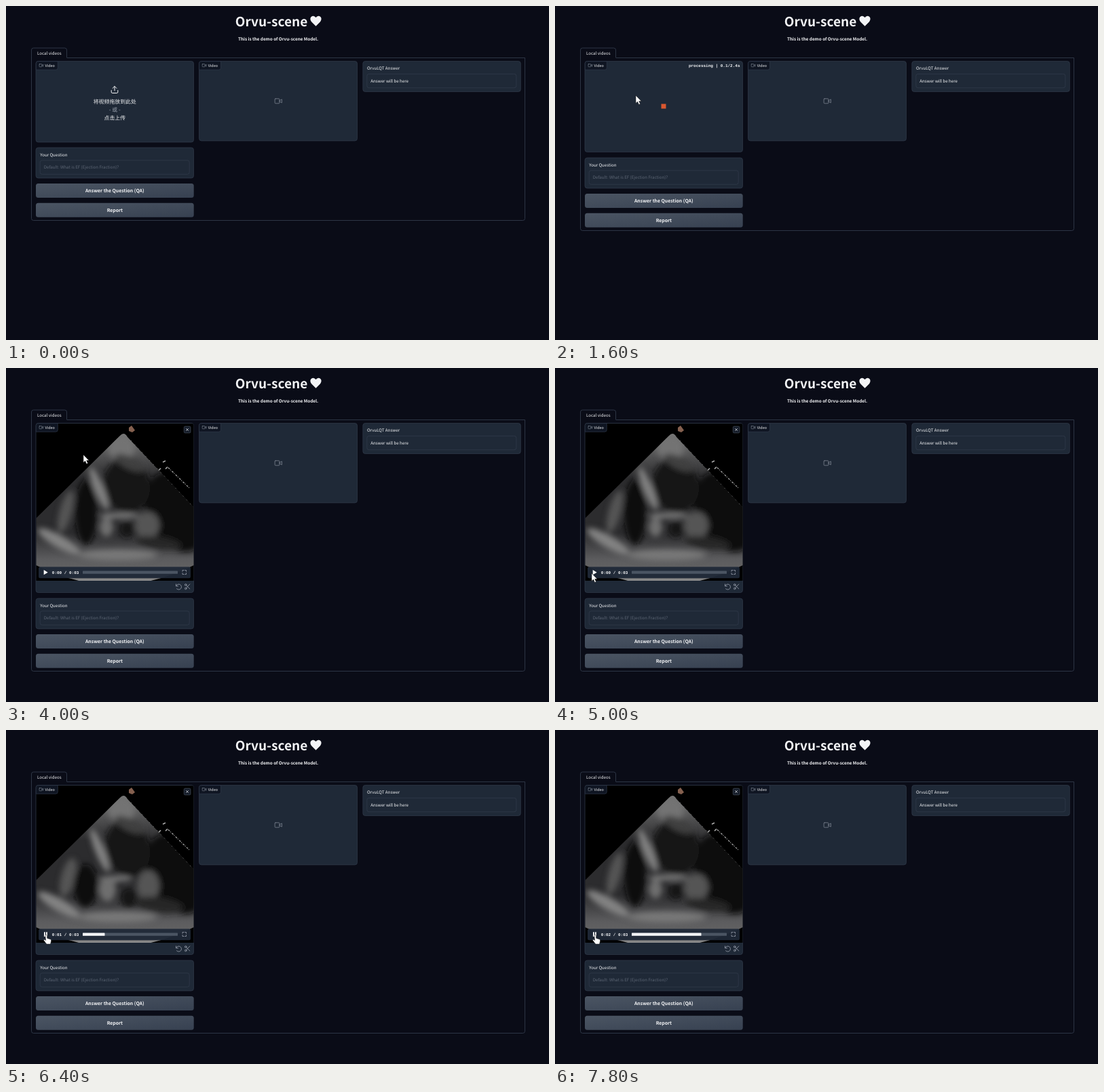
An HTML page that plays this animation: 800 by 493 pixels, repeating every 8 s.

```html
<!DOCTYPE html>
<html lang="en">
<head>
<meta charset="utf-8">
<title>Video demo</title>
<style>
  html, body { margin: 0; width: 100%; height: 100%; overflow: hidden; background: #0a0c17; }
  svg { display: block; width: 100%; height: 100%; }
  text { font-family: "Noto Sans CJK SC", "Noto Sans CJK", "Open Sans", sans-serif; font-size: 6.2px; fill: #f3f4f6; white-space: pre; text-rendering: geometricPrecision; }
  .mid { text-anchor: middle; }
  .bold { font-weight: 700; }
  .button { font-size: 6.9px; font-weight: 700; }
  .mono { font: 700 6px "Liberation Mono", "DejaVu Sans Mono", monospace; }
  .panel { fill: #1f2937; stroke: #374151; stroke-width: .6; }
  .frame { fill: none; stroke: #374151; stroke-width: .8; }
  .line { fill: none; stroke: #9ca3af; stroke-width: .8; stroke-linecap: round; stroke-linejoin: round; }
</style>
</head>
<body>
<svg viewBox="0 0 800 493" preserveAspectRatio="none">
  <defs>
    <linearGradient id="buttonFill" x1="0" y1="0" x2="1" y2="1">
      <stop offset="0" stop-color="#4b5563"/><stop offset="1" stop-color="#374151"/>
    </linearGradient>
    <linearGradient id="tissue" x1="0" y1="97" x2="0" y2="318" gradientUnits="userSpaceOnUse">
      <stop offset="0" stop-color="#777"/><stop offset=".3" stop-color="#2c2c2e"/>
      <stop offset=".66" stop-color="#2c2c2e"/><stop offset=".84" stop-color="#5c5c5e"/>
      <stop offset=".95" stop-color="#666"/><stop offset="1" stop-color="#aaa"/>
    </linearGradient>
    <clipPath id="videoClip"><path d="M44.5 314V85q0-3 3-3H273.500q3 0 3 3V314z"/></clipPath>
    <clipPath id="sector"><path d="M168 100Q174 93 179 102L277 206V291Q160 349 44 291V222z"/></clipPath>
    <filter id="soft" x="-30%" y="-30%" width="160%" height="160%"><feGaussianBlur stdDeviation="4"/></filter>
    <g id="camera" class="line">
      <rect x="0" y="0" width="6.800" height="7" rx="1"/>
      <path d="M6.800 3L10.300 1V6L6.800 4"/>
    </g>
    <g id="videoTag">
      <path d="M0 3q0-3 3-3H32V9.500q0 3-3 3H0z" fill="#0f1522" stroke="#374151" stroke-width=".6"/>
      <use href="#camera" transform="translate(4.700 4) scale(.58)"/>
      <text x="13.200" y="8.500" style="font-size:5.5px;font-weight:500">Video</text>
    </g>
  </defs>

  <rect width="800" height="493" fill="#0a0c17"/>
  <text class="mid bold" x="391" y="29.500" style="font-size:19px">Orvu-scene</text>
  <path d="M456.500 29.800L450 23.200C446.500 18.500 449.500 14.500 452.800 14.800Q455 15 456.500 17Q458 15 460.200 14.800C463.500 14.500 466.500 18.500 463 23.200z" fill="#f3f4f6"/>
  <text class="mid bold" x="401" y="51.200" style="font-size:6.35px">This is the demo of Orvu-scene Model.</text>

  <path id="outer" class="frame"/>
  <path class="frame" d="M37.500 77V65q0-3 3-3H86.500q3 0 3 3V76.500"/>
  <text x="46" y="71.700">Local videos</text>

  <rect class="panel" x="284.500" y="81.500" width="233" height="117.500" rx="3.500"/>
  <use href="#videoTag" x="284.500" y="81.700"/>
  <use href="#camera" x="396.100" y="136.800" opacity=".75"/>

  <rect class="panel" x="525.800" y="81.500" width="232.500" height="45" rx="3.500"/>
  <text x="532" y="93.700">OrvuLQT Answer</text>
  <rect class="panel" x="531.800" y="100.300" width="220" height="20.500" rx="3"/>
  <text x="537.300" y="112.700">Answer will be here</text>

  <rect id="media" class="panel" x="44" y="81.500" width="232.500" rx="3.500"/>

  <g id="upload">
    <path class="line" style="stroke:#f3f4f6;stroke-width:1" d="M155.200 124.500V127q0 1.500 1.500 1.500H163.300q1.500 0 1.500-1.500V124.500M160 125V118.700M157 121.500L160 118.500L163 121.500"/>
    <text class="mid" x="160.300" y="144" style="font-size:7.9px">将视频拖放到此处</text>
    <text class="mid" x="160.300" y="155.600" style="font-size:7.9px;fill:#9ca3af">- 或 -</text>
    <text class="mid" x="160.300" y="167.600" style="font-size:7.9px">点击上传</text>
  </g>

  <g id="processing">
    <rect id="eta" x="44.300" y="81.800" height="133.400" fill="#151b29"/>
    <rect x="156.500" y="144.500" width="7" height="7" fill="#d9572f"/>
    <text id="counter" class="mono" x="272.500" y="90" text-anchor="end"></text>
  </g>

  <g id="player">
    <g clip-path="url(#videoClip)">
      <rect x="44" y="81" width="233" height="233"/>
      <g clip-path="url(#sector)">
        <rect x="44" y="90" width="233" height="230" fill="url(#tissue)"/>
        <g id="scan" filter="url(#soft)"></g>
      </g>
      <path d="M181 88L185 85L190 92L186 95L181 93z" fill="#84604f"/>
      <g stroke="#aaa" fill="none">
        <path d="M184 107L273 202" stroke-width=".8" stroke-dasharray="1 7"/>
        <path d="M239 147L271 178" stroke-width="1.200" stroke-dasharray="3 1.500 1 2"/>
        <path d="M231 139L235 137M225 151L228 148M235 149L238 146" stroke-width="1.600"/>
      </g>
    </g>
    <rect x="48" y="293.500" width="224" height="16.700" rx="2.500" fill="#1f2937" fill-opacity=".95"/>
    <path id="playIcon" fill="#fff"/>
    <text id="clock" class="mono" x="67.800" y="303.500"></text>
    <rect x="113" y="299.500" width="140" height="4.300" rx=".6" fill="#4b5563"/>
    <rect id="played" x="113" y="299.500" height="4.300" rx=".6" fill="#f3f4f6"/>
    <path class="line" d="M260 300.300V298.500H262M263.700 298.500H265.500V300.300M265.500 302.700V304.500H263.700M262 304.500H260V302.700"/>
    <rect x="262.300" y="86.200" width="9.600" height="9.600" rx="1.500" fill="#151c29" stroke="#4b5563" stroke-width=".7"/>
    <path class="line" style="stroke:#d1d5db" d="M265.500 89.400L268.700 92.600M268.700 89.400L265.500 92.600"/>
    <path class="line" d="M250.500 319V322H253.500M250.700 321.700A4 4 0 1 1 251.500 325.800"/>
    <g class="line">
      <circle cx="264.700" cy="320" r="1.300"/><circle cx="264.700" cy="325.500" r="1.300"/>
      <path d="M265.700 321L270.800 326M265.700 324.500L270.800 319"/>
    </g>
  </g>
  <use href="#videoTag" x="44.300" y="81.700"/>

  <g id="lower">
    <rect class="panel" x="44" y="209" width="232.500" height="45" rx="3.500"/>
    <text x="50.200" y="221.500">Your Question</text>
    <rect class="panel" x="50.200" y="227.800" width="220" height="20.500" rx="3"/>
    <text x="55.800" y="240.400" style="fill:#5d6675">Default: What is EF (Ejection Fraction)?</text>
    <rect x="44" y="262" width="232.700" height="21" rx="3.500" fill="url(#buttonFill)"/>
    <text class="mid button" x="160.300" y="275.200">Answer the Question (QA)</text>
    <rect x="44" y="290.700" width="232.700" height="21" rx="3.500" fill="url(#buttonFill)"/>
    <text class="mid button" x="160.300" y="303.900">Report</text>
  </g>

  <path id="arrow" d="M0 0V11.500L2.600 9.200L4.600 13.500L6.600 12.600L4.700 8.500H8.200z" fill="#fff" stroke="#111" stroke-width=".5"/>
  <path id="hand" d="M-1.200 1Q0-.8 1.200 1L1.800 5.500L6.300 6.700Q8 7.500 7.600 9.500L6.500 14H.8L-3.400 8.500Q-3.300 6.800-1.700 7.500L-.4 8.500z" fill="#fff" stroke="#111" stroke-width=".5"/>
</svg>
<script>
const LOOP = 8000, STEP = 200;
const START = 1500, READY = 4000, PLAY = 5750, CLIP = 2800, BEAT = 2050;
const el = id => document.getElementById(id);
const set = (id, attrs) => {
  for (const k in attrs) el(id).setAttribute(k, attrs[k]);
};
const show = (id, on) => set(id, { display: on ? "inline" : "none" });

// Resting ellipse, grey level, then the shift of x, y, rx, ry at full contraction.
const tissue = [
  { e: [170, 118, 20, 18, 0], g: 115 },
  { e: [252, 212, 44, 62, -25], g: 14 },
  { e: [178, 174, 34, 40, -15], g: 18, d: [2, 2, -2, 3] },
  { e: [182, 140, 24, 9, 25], g: 65 },
  { e: [88, 212, 9, 32, 15], g: 85, d: [5, 8, 2, -4] },
  { e: [118, 213, 16, 48, 0], g: 10, d: [-1, 24, 2, -23] },
  { e: [137, 178, 7, 34, -22], g: 130, d: [2, 0, 0, 0] },
  { e: [167, 218, 30, 4, 0], g: 125, d: [-8, 2, -8, 0] },
  { e: [148, 235, 10, 14, 0], g: 110, d: [2, 0, 4, 6] },
  { e: [208, 232, 18, 20, 0], g: 85, d: [2, -3, -2, 4] },
  { e: [178, 238, 11, 12, 0], g: 20, d: [4, 14, 2, 4] },
  { e: [225, 258, 34, 9, 8], g: 38, d: [0, 0, 4, 3] },
  { e: [78, 256, 36, 9, 30], g: 130, d: [0, 3, 0, 0] },
  { e: [165, 276, 58, 8, 0], g: 120 }
];
for (const part of tissue) {
  part.node = document.createElementNS("http://www.w3.org/2000/svg", "ellipse");
  part.node.setAttribute("fill", `rgb(${part.g},${part.g},${part.g})`);
  el("scan").append(part.node);
}

function drawScan(v) {
  const s = .5 - .5 * Math.cos(2 * Math.PI * v / BEAT);
  for (const { e, d = [0, 0, 0, 0], node } of tissue) {
    const [cx, cy, rx, ry] = d.map((shift, i) => e[i] + shift * s);
    node.setAttribute("cx", cx);
    node.setAttribute("cy", cy);
    node.setAttribute("rx", rx);
    node.setAttribute("ry", ry);
    node.setAttribute("transform", `rotate(${e[4]} ${cx} ${cy})`);
  }
}

const path = [
  [200, 135, 148], [400, 119, 132], [1600, 119, 132], [3600, 114, 128],
  [4000, 114, 128], [5000, 54, 303], [5400, 59, 302]
];
function pointer(t) {
  const i = path.findIndex(p => p[0] > t);
  if (i < 0) return path.at(-1).slice(1);
  const a = path[Math.max(i - 1, 0)], b = path[i];
  const k = Math.max(0, (t - a[0]) / (b[0] - a[0] || 1));
  const ease = k * k * (3 - 2 * k);
  return [a[1] + (b[1] - a[1]) * ease, a[2] + (b[2] - a[2]) * ease];
}

function draw(t) {
  const loading = t >= START && t < READY, ready = t >= READY;
  const shift = ready ? 131 : loading ? 15 : 0;
  set("outer", { d: `M90 76.5H764.5V${313.5 + shift}q0 3-3 3H40.500q-3 0-3-3V76.5` });
  set("media", { height: ready ? 250 : loading ? 134 : 119.5 });
  set("lower", { transform: `translate(0 ${shift})` });
  show("upload", t < START);
  show("processing", loading);
  show("player", ready);

  if (loading) {
    set("eta", { width: Math.min(232, Math.max(0, (t - 1600) * .105)) });
    el("counter").textContent = `processing | ${((t - START) / 1000).toFixed(1)}/2.4s`;
  }
  if (ready) {
    const v = Math.max(0, t - PLAY);
    drawScan(v);
    set("played", { width: 140 * v / CLIP });
    set("playIcon", { d: v ? "M56 298.300H57.800V305H56zM59 298.300H60.800V305H59z" : "M55.700 298V305.300L61.700 301.650z" });
    el("clock").textContent = `0:0${Math.round(v / 1000)} / 0:03`;
  }

  const [x, y] = pointer(t), onButton = t >= 5400;
  show("arrow", t >= 200 && !onButton);
  show("hand", onButton);
  set(onButton ? "hand" : "arrow", { transform: `translate(${x} ${y})` });
}

const origin = performance.now();
function tick() {
  const t = (performance.now() - origin) % LOOP;
  draw(Math.floor(t / STEP) * STEP);
  requestAnimationFrame(tick);
}
tick();
</script>
</body>
</html>
```
